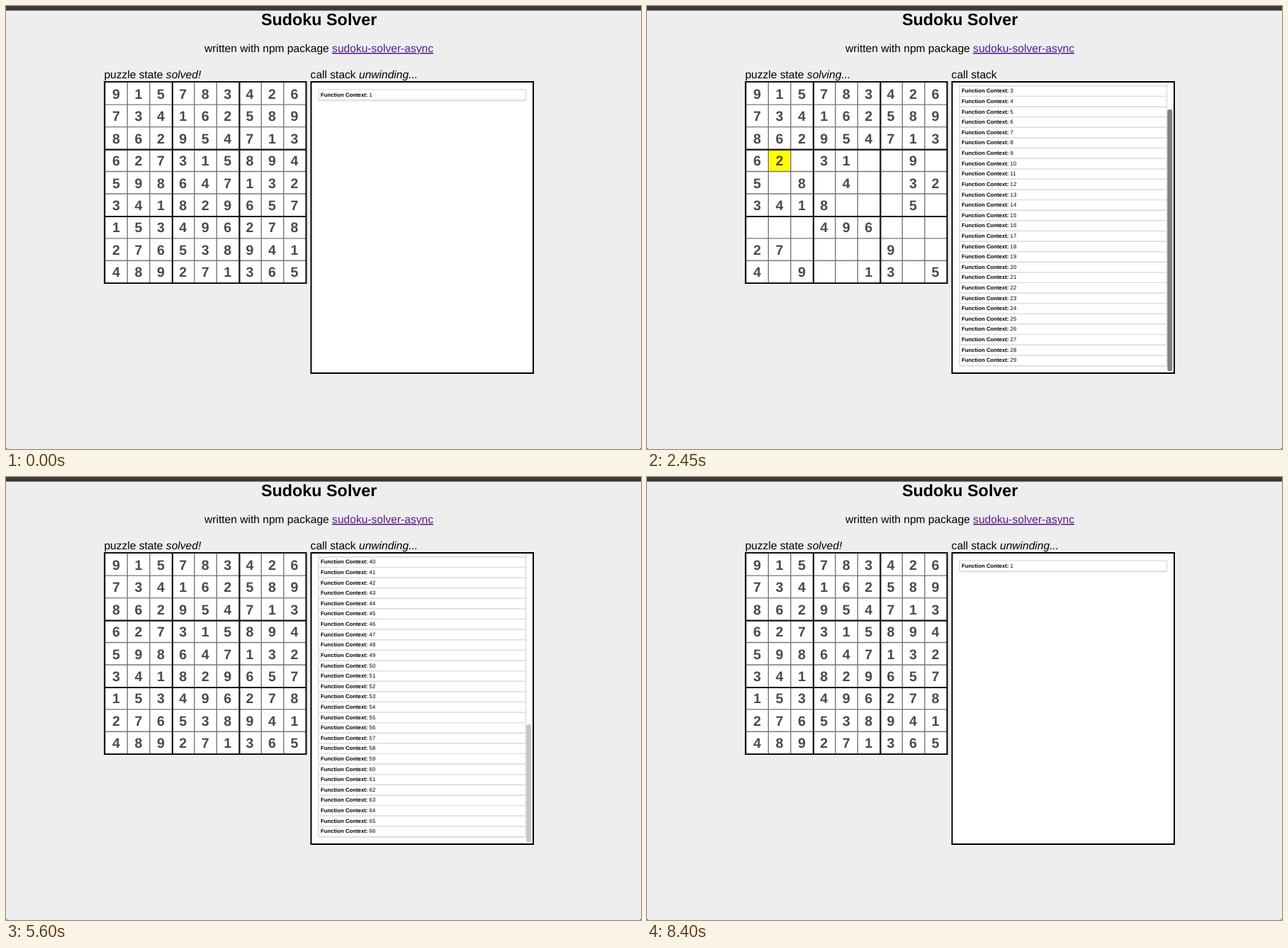
Recreate the animation shown at these times as an HTML page. Size 896x625 px, loop 9.66 s.

```html
<!DOCTYPE html>
<html lang="en">
<head>
<meta charset="utf-8">
<title>Sudoku Solver</title>
<style>
  html, body { margin: 0; height: 100%; overflow: hidden; background: #eee; }
  svg { display: block; font: 15.58px "Liberation Sans", Arial, sans-serif; text-rendering: geometricPrecision; }
  .title { font-size: 23.37px; font-weight: bold; }
  .link { fill: #551a8b; text-decoration: underline; }
  .italic { font-style: italic; }
  .digit { font-size: 19.5px; font-weight: bold; fill: #4a4a4a; text-anchor: middle; }
  .row { font-size: 7.79px; }
  .row tspan { font-weight: bold; }
  .list { fill: #fff; filter: drop-shadow(0 1px 1px rgba(0, 0, 0, .2)); }
</style>
</head>
<body>
<svg width="896" height="625" viewBox="0 0 896 625">
  <defs><clipPath id="view"><rect x="431.5" y="108" width="311.5" height="409"/></clipPath></defs>
  <rect width="896" height="625" fill="#555"/>
  <rect width="896" height="625" rx="3" fill="#eee"/>
  <rect width="896" height="6.5" fill="#3a3a3a"/>
  <text class="title" x="359.9" y="26.6">Sudoku Solver</text>
  <text x="280" y="65">written with npm package <tspan class="link">sudoku-solver-async</tspan></text>
  <text x="138.4" y="102.3">puzzle state <tspan class="italic" id="puzzleState"></tspan></text>
  <text x="429.6" y="102.3">call stack <tspan class="italic" id="stackState"></tspan></text>
  <rect x="139.2" y="107" width="284.3" height="284" fill="#fff"/>
  <g id="board"></g>
  <g id="lines"></g>
  <rect x="430.5" y="107" width="313.5" height="411" fill="#fff" stroke="#000" stroke-width="2"/>
  <g id="stack" clip-path="url(#view)"></g>
</svg>
<script>
const STEP = 70, STEPS = 138, START = 12, ROW = 14.61;
const $ = id => document.getElementById(id);
const colX = k => 139.8 + 31.5 * k;
const rowY = k => 107.7 + 31.45 * k;

const puzzle = [
  "9.5..34.6", ".....2.89", ".6...47.3",
  "...31..9.", "5.8.4..32", "3418...5.",
  "...496...", "27....9..", "4.9..13.5"
].join("");

// Backtracking solver that logs every visible state.
const cells = [...puzzle], log = [];
const record = i => log.push({ i, cells: cells.join("") });

function fits(i, v) {
  const r = Math.floor(i / 9), c = i % 9;
  return !cells.some((d, j) => {
    const y = Math.floor(j / 9), x = j % 9;
    const sameBox = Math.floor(y / 3) === Math.floor(r / 3) && Math.floor(x / 3) === Math.floor(c / 3);
    return d === v && (y === r || x === c || sameBox);
  });
}

function solve(i) {
  if (i === 81) return true;
  if (puzzle[i] !== ".") {
    record(i);
    return solve(i + 1);
  }
  cells[i] = "?";
  record(i);
  for (const v of "123456789") {
    if (!fits(i, v)) continue;
    cells[i] = v;
    record(i);
    if (solve(i + 1)) return true;
  }
  cells[i] = ".";
  return false;
}
solve(0);
const solution = cells.join("");

function stateAt(step) {
  if (step >= START) {
    const e = Math.floor(2.2 * (step - START) - 0.5 + 0.3 * Math.max(0, step - 61));
    const entry = log[Math.max(0, e)];
    if (entry) return { cells: entry.cells, active: entry.i, depth: entry.i + 1, thumb: 0.5 };
  }
  const depth = step < START ? 1 : Math.max(1, Math.min(81, Math.round(66 - 1.625 * (step - 80))));
  const thumb = step < 79 ? 0.5 : step === 79 ? 0.4 : step === 80 ? 0.22 : 0;
  return { cells: solution, active: -1, depth, thumb, solved: true };
}

const lens = (x, y) => `<g transform="translate(${x} ${y})" stroke-linecap="round">
  <path d="M2 2L8 8" stroke="#222" stroke-width="3.4"/>
  <circle cx="-2.8" cy="-2.8" r="5.4" fill="#dfe8e6" stroke="#555" stroke-width="1.6"/></g>`;

function boardSvg({ cells, active }) {
  let out = "";
  [...cells].forEach((d, i) => {
    const c = i % 9, r = Math.floor(i / 9);
    const x = 155.5 + 31.42 * c, y = 124 + 31.4 * r;
    if (i === active) out += `<rect x="${colX(c)}" y="${rowY(r)}" width="31.5" height="31.45" fill="#ff0"/>`;
    if (d === "?") out += lens(x, y);
    else if (d !== ".") out += `<text class="digit" x="${x}" y="${y + 7}">${d}</text>`;
  });
  return out;
}

function stackSvg({ depth, thumb }) {
  const height = ROW * depth;
  const shift = Math.min(0, 389.3 - height);
  const top = 118 + shift;
  let out = `<rect class="list" x="441" y="${top}" width="292.5" height="${height}"/>`;
  for (let n = 0; n < depth; n++) {
    const y = top + ROW * n;
    out += `<rect x="441.3" y="${y}" width="292" height="${ROW}" fill="none" stroke="#ddd" stroke-width="1.2"/>
      <text class="row" x="443.9" y="${y + 9.6}"><tspan>Function Context:</tspan> ${n + 1}</text>`;
  }
  if (shift < 0 && thumb) {
    const size = 400 * 410 / (20 + height);
    out += `<rect x="734.3" y="${515.3 - size}" width="7" height="${size}" rx="3.5" fill-opacity="${thumb}"/>`;
  }
  return out;
}

function gridSvg() {
  let thin = "", thick = "";
  for (let k = 1; k < 9; k++) {
    const bold = k % 3 === 0;
    const x = colX(k) + (bold ? 0.6 : 0), y = rowY(k) + (bold ? 0.6 : 0);
    const d = `M${x} 107V391M139 ${y}H424`;
    if (bold) thick += d; else thin += d;
  }
  return `<path d="${thin}" stroke="#777" stroke-width="1.4"/>
    <path d="${thick}M139.2 107H423.5V391H139.2Z" fill="none" stroke="#111" stroke-width="2.2"/>`;
}
$("lines").innerHTML = gridSvg();

let shown = -1;
function draw(now) {
  const step = Math.floor(now / STEP) % STEPS;
  if (step !== shown) {
    shown = step;
    const state = stateAt(step);
    $("puzzleState").textContent = state.solved ? "solved!" : "solving...";
    $("stackState").textContent = state.solved ? "unwinding..." : "";
    $("board").innerHTML = boardSvg(state);
    $("stack").innerHTML = stackSvg(state);
  }
  requestAnimationFrame(draw);
}
draw(0);
</script>
</body>
</html>
```
